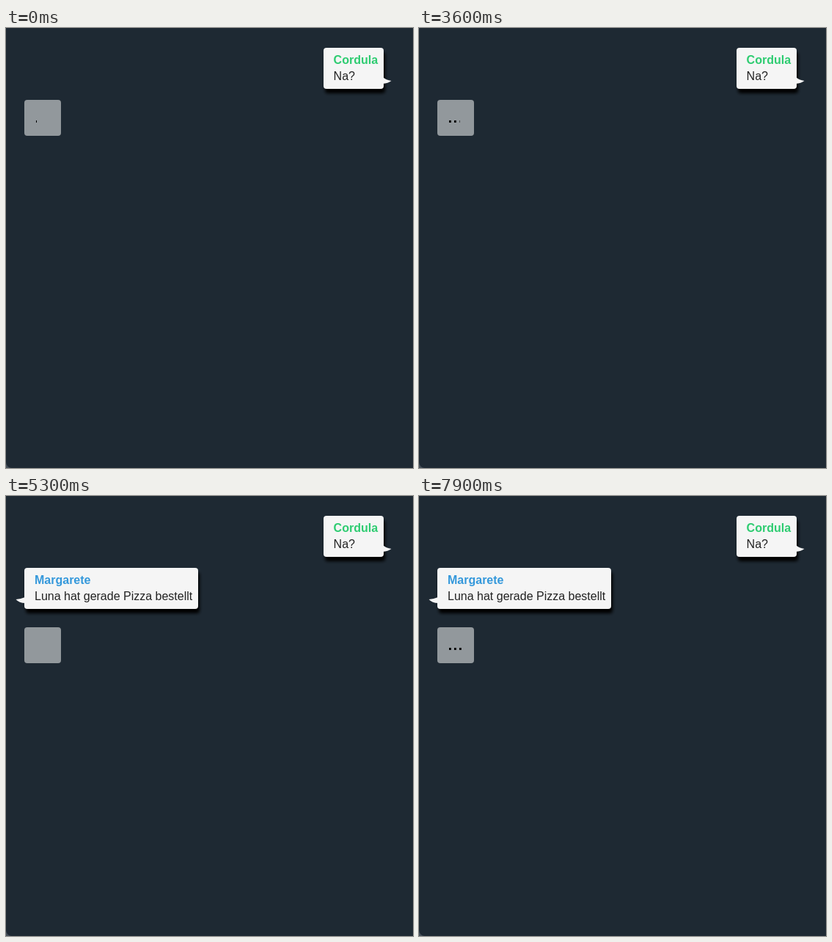
Animation, 555 px wide and 600 px high, one loop 8 s. Source, as an HTML page:

```html
<!DOCTYPE html>
<html lang="de">
<head>
<meta charset="utf-8">
<title>Chat</title>
<style>
  html, body { margin: 0; width: 100%; height: 100%; overflow: hidden; background: #1e2933; }
  svg { display: block; }
  text { font: 16px "Liberation Sans", Arial, sans-serif; fill: #222; }
  .name { font-weight: bold; }
  .card { fill: #f5f5f5; }
</style>
</head>
<body>
<svg width="555" height="600" viewBox="0 0 555 600">
  <defs>
    <filter id="blur" x="-20%" y="-40%" width="140%" height="180%">
      <feGaussianBlur stdDeviation="2"/>
    </filter>
    <clipPath id="reveal"><rect id="edge" x="39" y="120" width="0" height="16"/></clipPath>
  </defs>
  <rect width="555" height="600" fill="#1e2933"/>
  <path d="M0 592V600H8A8 8 0 0 1 0 592Z" fill="#46505a"/>

  <g>
    <rect x="435" y="33" width="82" height="56" rx="4" filter="url(#blur)"/>
    <path class="card" d="M514 67Q518 71 525.5 72Q521 75.5 514 76Z"/>
    <rect class="card" x="433" y="27" width="82" height="56" rx="4"/>
    <text class="name" x="446.6" y="49" style="fill:#2ecc71">Cordula</text>
    <text x="446.6" y="71">Na?</text>
  </g>

  <g id="reply">
    <rect x="27" y="104" width="237" height="56" rx="4" filter="url(#blur)"/>
    <path class="card" d="M26 138Q20 140.5 13.5 141Q18 146 26 146Z"/>
    <rect class="card" x="25" y="98" width="237" height="56" rx="4"/>
    <text class="name" x="39" y="120" style="fill:#3498db">Margarete</text>
    <text x="39" y="142">Luna hat gerade Pizza bestellt</text>
  </g>

  <g id="typing">
    <rect x="25" y="98" width="50" height="49" rx="4" fill="#92989c"/>
    <path d="M41 126h2.8v3h-2.8zM48 126h2.8v3h-2.8zM55 126h2.8v3h-2.8z" clip-path="url(#reveal)"/>
  </g>
</svg>
<script>
  const LOOP = 8000, CYCLE = 1364, LEAD = 168, MS_PER_PX = 64;
  const SENT = 5300, CLEARED = 5150;
  const [reply, typing, edge] = ["reply", "typing", "edge"].map(id => document.getElementById(id));

  function draw(t) {
    const sent = t >= SENT;
    reply.setAttribute("visibility", sent ? "visible" : "hidden");
    typing.setAttribute("transform", `translate(0 ${sent ? 81 : 0})`);

    // The dots are wiped in from the left, then start over.
    const phase = (t + 56 + LEAD) % CYCLE - LEAD;
    const idle = t > CLEARED && t < SENT;
    edge.setAttribute("width", idle ? 0 : Math.max(0, 2 + phase / MS_PER_PX));
  }

  const start = performance.now();
  function tick() {
    draw((performance.now() - start) % LOOP);
    requestAnimationFrame(tick);
  }
  tick();
</script>
</body>
</html>
```
